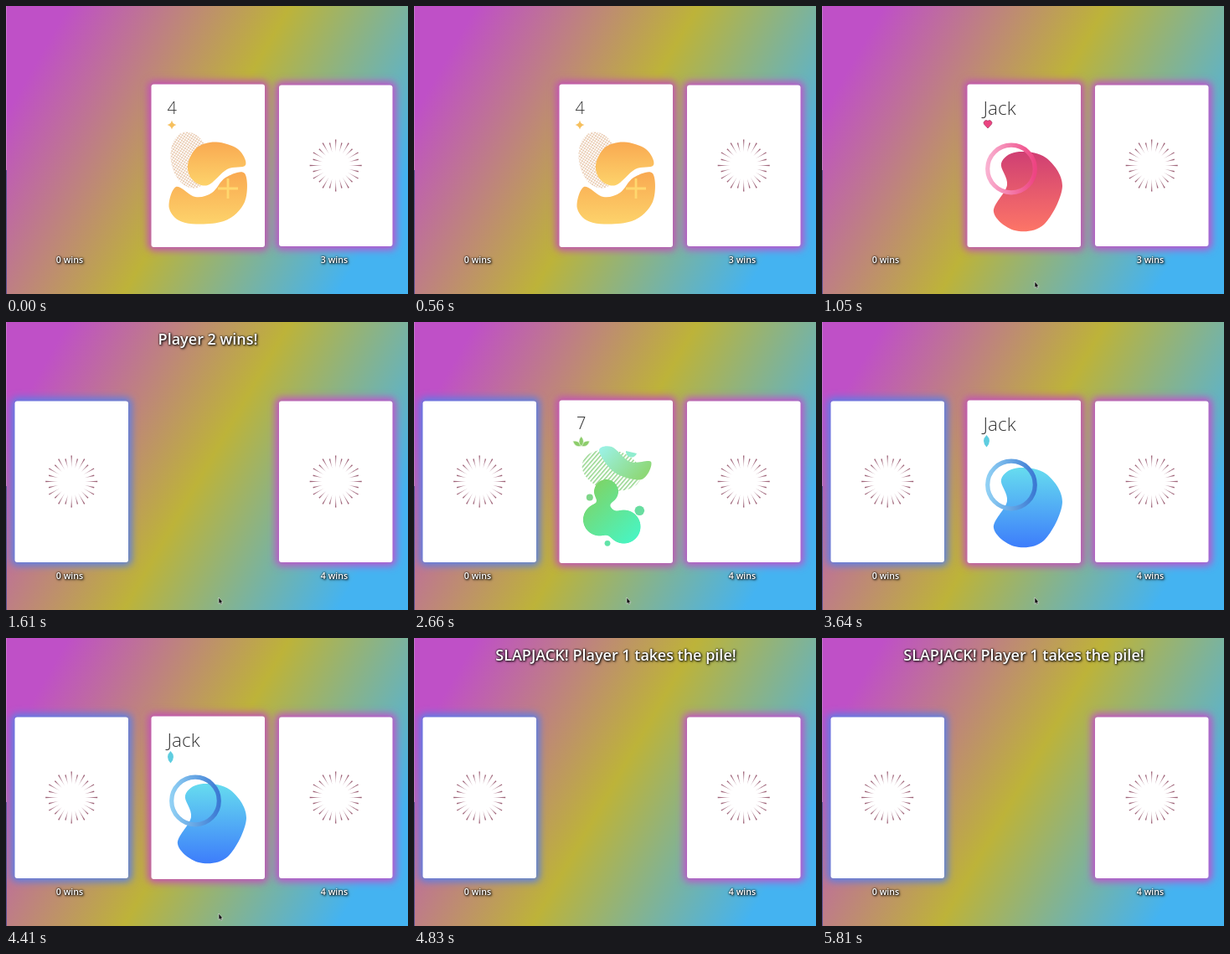
An HTML page that plays this animation: 480 by 344 pixels, repeating every 5.88 s.

```html
<!DOCTYPE html>
<html lang="en">
<head>
<meta charset="utf-8">
<title>Card game</title>
<style>
html, body { margin: 0; width: 100%; height: 100%; overflow: hidden; }
body { background: linear-gradient(120deg, #bf50c7 11%, #bdb339 50%, #44b3f1 87.5%); }
svg { display: block; width: 480px; height: 344px; }
.label { font-family: "Open Sans", "Noto Sans", sans-serif; font-weight: 600; fill: #fff; text-anchor: middle;
  filter: drop-shadow(0 0 1px #000) drop-shadow(1px 1px 1px #000a); }
.title { font-size: 18px; }
.wins { font-size: 10.6px; }
.rank { font-family: "Open Sans", "Noto Sans", sans-serif; font-weight: 300; fill: #333; }
</style>
</head>
<body>
<svg id="stage" viewBox="0 0 480 344"></svg>
<script>
const LOOP = 5880;
const SCENES = [
  { at: 0, card: "four", wins: 3 },
  { at: 770, card: "heartJack", wins: 3, pointer: true },
  { at: 1400, title: "Player 2 wins!", left: true, wins: 4, pointer: true },
  { at: 2660, card: "seven", left: true, wins: 4, pointer: true },
  { at: 3430, card: "blueJack", left: true, wins: 4, pointer: true },
  { at: 4550, title: "SLAPJACK! Player 1 takes the pile!", left: true, wins: 4 }
];

// Closed smooth curve through a few [x, y] points
function blob(...points) {
  const p = i => points.at(i % points.length);
  const toward = (a, b, c) => a.map((v, k) => v + (c[k] - b[k]) / 6);
  const curves = points.map((a, i) => {
    const b = p(i + 1);
    return `C${toward(a, p(i - 1), b)} ${toward(b, p(i + 2), a)} ${b}`;
  });
  return `M${points[0]}${curves.join("")}Z`;
}

const path = (d, fill, extra = "") => `<path d="${d}" fill="${fill}" ${extra}/>`;
const dot = (x, y, r, fill) => `<circle cx="${x}" cy="${y}" r="${r}" fill="${fill}"/>`;
const oval = (x, y, rx, ry, turn, fill) =>
  `<ellipse rx="${rx}" ry="${ry}" transform="translate(${x} ${y}) rotate(${turn})" fill="${fill}"/>`;
const rank = (x, y, size, s) => `<text class="rank" x="${x}" y="${y}" font-size="${size}">${s}</text>`;
const repeat = (n, make) => Array.from({ length: n }, (_, i) => make(i)).join("");

function gradient(id, x2, y2, from, to) {
  return `<linearGradient id="${id}" x2="${x2}" y2="${y2}">
    <stop stop-color="${from}"/><stop offset="1" stop-color="${to}"/></linearGradient>`;
}

function panel(x, y, w, h, glow) {
  return `<rect x="${x - 4}" y="${y - 4}" width="${w + 8}" height="${h + 8}" rx="6" fill="${glow}" filter="url(#blur)"/>
    <rect x="${x}" y="${y}" width="${w}" height="${h}" rx="3" fill="#fff"/>`;
}

function burst(cx, cy) {
  const ray = i => `<path d="M16 0L${i % 2 ? 28 : 31} -0.7V0.7Z" transform="rotate(${i * 15})"/>`;
  return `<g fill="url(#ray)" transform="translate(${cx} ${cy})">${repeat(24, ray)}</g>`;
}

const deck = (x, glow) => panel(x, 94.5, 135.5, 192.5, glow) + burst(x + 67.7, 190.5);

function jack(color, suit) {
  const body = blob([214, 188], [232, 174.5], [267, 181], [287, 215], [265, 261], [230, 268], [205, 246], [221, 214]);
  return rank(192.5, 130, 22.5, "Jack") + suit + path(body, `url(#${color}Body)`) +
    `<circle cx="226" cy="194.5" r="28.3" fill="none" stroke="url(#${color}Ring)" stroke-width="5.2"/>`;
}

function four() {
  const upper = blob([217, 190], [228, 169], [251, 162.5], [277, 171], [286, 190], [264, 195], [241, 214], [223, 208]);
  const lower = blob([203, 216], [226, 228], [246, 223], [262, 205], [285, 200], [285, 234], [260, 257], [214, 259], [195, 242]);
  return rank(192.5, 128.5, 20, "4") +
    path("M198 136.500q1 4.500 5.500 5.500q-4.500 1-5.500 5.500q-1-4.500-5.500-5.500q4.500-1 5.500-5.500z", "#f6c05e") +
    oval(220, 184, 23, 34, -12, "url(#dots)") + path(lower, "url(#amber)") + path(upper, "url(#amber)") +
    path("M265 206v24m-12-12h24", "none", 'stroke="#ffd76e" stroke-width="2.8"');
}

function seven() {
  const wave = blob([221, 154], [236, 149], [258, 167], [283, 167], [272, 188], [240, 180]);
  const leaf = i => `<path d="M0 0Q-5.500-5.500 0-12Q5.500-5.500 0 0Z" transform="rotate(${[-58, 58, 0][i]})"/>`;
  return rank(194, 128, 20, "7") +
    `<g fill="#8dcd6b" stroke="#fff" stroke-width=".6" transform="translate(199.700 148.500)">${repeat(3, leaf)}</g>` +
    oval(236, 177, 36, 24, 14, "url(#hatch)") + path(wave, "url(#mint)") +
    path("M253 154L266 157A6.700 6.700 0 0 1 253 154Z", "#90edcf") +
    path("M201 187h70v80h-70z", "url(#green)", 'mask="url(#lobes)"') +
    dot(209.8, 209.5, 4, "#7fd68a") + dot(269.3, 225.3, 5.8, "#68dda0") + dot(231, 264.3, 3.4, "#62e3a8");
}

const heart = path("M198 146l-4.400-4.700a3 3 0 0 1 4.400-4a3 3 0 0 1 4.400 4z", "#ec4380", 'stroke="#a33a62" stroke-width=".7"');
const drop = path("M196.500 135q7 7 0 14.500q-7-7.500 0-14.500z", "#5ecde0");

const cards = {
  four: four(),
  heartJack: jack("rose", heart),
  seven: seven(),
  blueJack: jack("sky", drop)
};

const stage = document.getElementById("stage");
stage.innerHTML = `<defs>
  <filter id="blur" x="-20%" y="-20%" width="140%" height="140%"><feGaussianBlur stdDeviation="5"/></filter>
  <filter id="merge">
    <feGaussianBlur stdDeviation="3.5"/>
    <feColorMatrix values="1 0 0 0 0  0 1 0 0 0  0 0 1 0 0  0 0 0 12 -5"/>
  </filter>
  <mask id="lobes"><g filter="url(#merge)">
    ${dot(229.5, 202.5, 14.5, "#fff")}${dot(221.5, 236, 19.5, "#fff")}${dot(250.5, 244.5, 20, "#fff")}
  </g></mask>
  ${gradient("ray", 1, 0, "#d9c3cc", "#98596f")}
  ${gradient("roseBody", 0, 1, "#cf3f73", "#fd7567")}
  ${gradient("roseRing", 1, 0, "#f9b0d0", "#ee4482")}
  ${gradient("skyBody", 0, 1, "#66dcef", "#3d7dfb")}
  ${gradient("skyRing", 1, 0, "#90d0f4", "#3b79d3")}
  ${gradient("amber", 0, 1, "#f9a951", "#fdd36b")}
  ${gradient("mint", 1, 0.6, "#9cf3ec", "#8ed878")}
  ${gradient("green", 0.8, 1, "#86cf58", "#48f5c3")}
  <pattern id="dots" width="4" height="4" patternUnits="userSpaceOnUse">
    ${dot(1, 1, 0.85, "#d59a68")}${dot(3, 3, 0.85, "#d59a68")}
  </pattern>
  <pattern id="hatch" width="3.7" height="8" patternUnits="userSpaceOnUse" patternTransform="rotate(27)">
    <rect width="1.5" height="8" fill="#93d58c"/>
  </pattern>
</defs>
${path("M0 0h1v196h-1z", "#d8c0e055")}${path("M0 196h1v148h-1z", "#59508f")}
<g id="left">${deck(10.5, "#587fe6")}</g>
${deck(326, "#c24fcb")}
<g id="pile">${panel(173.5, 93.5, 135.5, 194.5, "#c24fb9")}<g id="face"></g></g>
<text class="label wins" x="76" y="307">0 wins</text>
<text class="label wins" id="wins" x="392" y="307"></text>
<text class="label title" id="title" x="241" y="27"></text>
<path id="pointer" d="M254 329v7.500l1.700-1.300 1.100 2.300 1.200-.5-1-2.200h2z" fill="#111" stroke="#fff" stroke-width=".5"/>`;

const el = id => document.getElementById(id);
const show = (id, on) => { el(id).style.display = on ? "" : "none"; };
let current;

function draw(t) {
  const scene = SCENES.findLast(s => s.at <= t);
  if (scene === current) return;
  current = scene;
  show("left", scene.left);
  show("pile", scene.card);
  show("pointer", scene.pointer);
  el("face").innerHTML = cards[scene.card] || "";
  el("title").textContent = scene.title || "";
  el("wins").textContent = `${scene.wins} wins`;
}

const start = performance.now();
function tick() {
  draw((performance.now() - start) % LOOP);
  requestAnimationFrame(tick);
}
tick();
</script>
</body>
</html>
```
